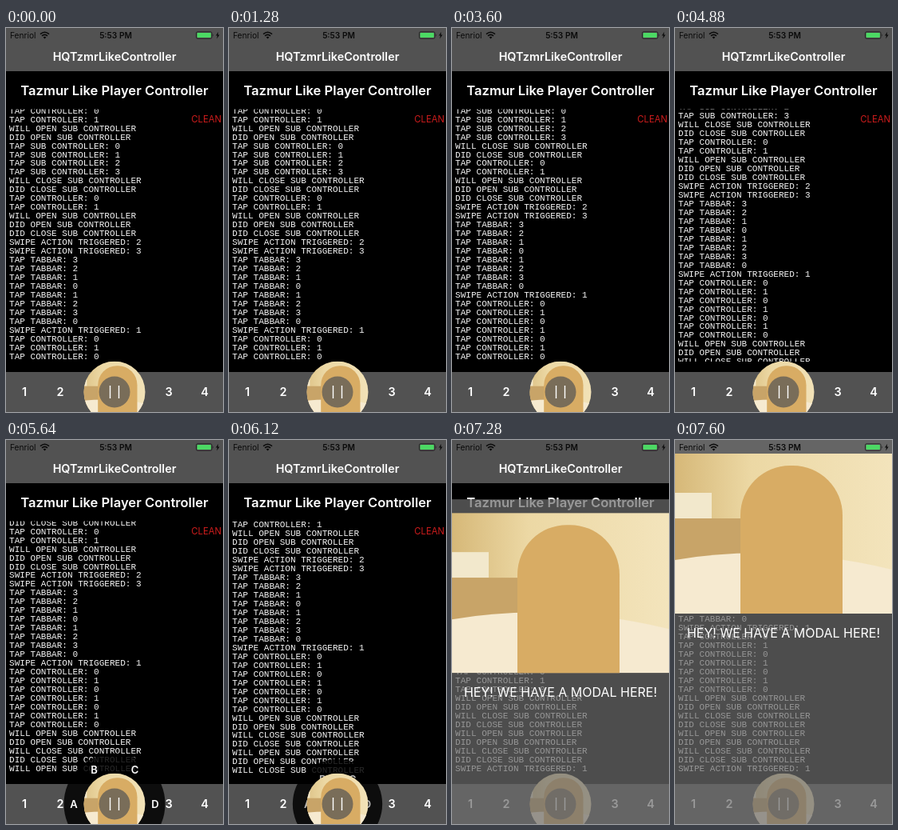
Animation of 272x480 px, one loop 8 s. Source, as an HTML page:

```html
<!DOCTYPE html>
<html lang="en">
<head>
<meta charset="utf-8">
<title>Player controller demo</title>
<style>
  html, body { margin: 0; width: 100%; height: 100%; overflow: hidden; background: #000; }
  svg { display: block; width: 272px; height: 480px; }
  text { font-family: Inter, "Open Sans", sans-serif; fill: #fff; }
  .mid { text-anchor: middle; }
  .semi { font-weight: 600; }
  .log text { font: 11.05px "Courier New", "Liberation Mono", monospace; fill: #f4f4f4; }
  .status text { font-size: 10.2px; fill: #0a0a0a; }
</style>
</head>
<body>
<svg viewBox="0 0 272 480">
  <defs>
    <linearGradient id="wall">
      <stop stop-color="#d6b878"/><stop offset=".35" stop-color="#ecd8a4"/><stop offset="1" stop-color="#f3e4bc"/>
    </linearGradient>
    <clipPath id="logClip"><rect y="101.5" width="272" height="315.5"/></clipPath>
    <clipPath id="ballClip"><circle r="38.5"/></clipPath>
    <clipPath id="photoClip"><rect y="17" width="272" height="200"/></clipPath>
    <g id="photo" clip-path="url(#photoClip)">
      <rect y="17" width="272" height="200" fill="url(#wall)"/>
      <rect y="66" width="46" height="32" fill="#f2e8cc"/>
      <rect y="98" width="92" height="52" fill="#c8a468"/>
      <path d="M0 150Q130 128 272 162V217H0Z" fill="#f6ead0"/>
      <rect x="82" y="32" width="128" height="260" rx="62" fill="#d8ac64"/>
    </g>
  </defs>

  <rect width="272" height="480"/>
  <g clip-path="url(#logClip)"><g class="log" id="log"></g></g>
  <text x="270" y="118" font-size="11.3" text-anchor="end" style="fill:#cc1c1c">CLEAN</text>

  <rect width="272" height="54" fill="#525252"/>
  <text class="mid semi" x="136" y="41" font-size="14.4">HQTzmrLikeController</text>
  <text class="mid semi" x="136" y="84" font-size="16.6">Tazmur Like Player Controller</text>

  <rect y="430" width="272" height="50" fill="#525252"/>
  <g class="mid semi" id="tabs" font-size="14.4"></g>

  <g transform="translate(136 455)">
    <circle id="disc" fill="#000" fill-opacity=".84"/>
    <g class="mid semi" id="subs" font-size="13"></g>
  </g>

  <g id="ball">
    <g clip-path="url(#ballClip)">
      <use href="#photo" transform="scale(.385) translate(-136 -117)"/>
    </g>
    <circle r="19.5" fill="#555" fill-opacity=".72"/>
    <path d="M-5.5-8V8M5.5-8V8" stroke="#fff" stroke-width="1.4"/>
  </g>

  <g id="modal">
    <rect width="272" height="480" fill="#6e6e6e" fill-opacity=".7"/>
    <use href="#photo"/>
    <text class="mid" x="136" y="247" font-size="16">HEY! WE HAVE A MODAL HERE!</text>
  </g>

  <g class="status">
    <text x="5" y="12.6">Fenriol</text>
    <text class="mid semi" x="137.5" y="12.6">5:53 PM</text>
    <path d="M43 7.6Q48.5 2.8 54 7.6M45 9.9Q48.5 6.8 52 9.9" fill="none" stroke="#0a0a0a" stroke-width="1.5"/>
    <path d="M46.6 11.6Q48.5 10 50.4 11.6L48.5 13.6Z" fill="#0a0a0a"/>
    <rect x="238.5" y="4.8" width="19.5" height="8.4" rx="1.6" fill="none" stroke="#181818" stroke-width=".8"/>
    <rect x="239.6" y="5.9" width="17.3" height="6.2" rx=".8" fill="#4cd964"/>
    <path d="M259 7.4q1.4 1.6 0 3.2z" fill="#181818"/>
    <path d="M266.2 4.8l-3.2 4.8h2l-.8 3.8 3.4-5h-2.1z" fill="#0a0a0a"/>
  </g>
</svg>
<script>
const LOOP = 8000, PITCH = 10.96, LAST_BASE = 413.6, SHOWN = 28;
const $ = id => document.getElementById(id);

function addText(parent, str, x, y) {
  const el = document.createElementNS("http://www.w3.org/2000/svg", "text");
  el.textContent = str;
  el.setAttribute("x", x);
  el.setAttribute("y", y);
  return parent.appendChild(el);
}

// Log lines
const series = (label, digits) => [...digits].map(d => `${label}: ${d}`);
const sub = (...verbs) => verbs.map(v => v + " SUB CONTROLLER");
const tap = digits => series("TAP CONTROLLER", digits);
const swipe = digits => series("SWIPE ACTION TRIGGERED", digits);
const opening = sub("WILL OPEN", "DID OPEN");
const closing = sub("WILL CLOSE", "DID CLOSE");
const lines = [
  ...tap("01"), ...opening, ...series("TAP SUB CONTROLLER", "0123"), ...closing,
  ...tap("01"), ...opening, closing[1], ...swipe("23"),
  ...series("TAP TABBAR", "32101230"), ...swipe("1"), ...tap("0101010"),
  ...opening, ...closing, ...opening, ...closing, ...swipe("1")
];
lines.forEach((s, i) => addText($("log"), s, 4, LAST_BASE + (i - SHOWN) * PITCH));

[23, 68, 204, 249].forEach((x, i) => addText($("tabs"), i + 1, x, 459.5));
const subs = [..."ABCD"].map(s => addText($("subs"), s, 0, 0));

// Tracks of [time, value]
const scroll = [
  [1560, 0], [1680, 1], [2210, 1], [2320, 2], [2640, 2], [2760, 3], [3040, 3], [3160, 4],
  [3640, 4], [3760, 5], [4120, 5], [4240, 6], [4850, 6], [4960, 8], [5240, 8], [5360, 9],
  [5880, 9], [6000, 10], [6040, 10], [6160, 11], [6280, 12], [7040, 12], [7200, 13]
];
const spread = [
  [3700, 0], [4000, 1], [4640, 1], [4800, 0], [5320, 0], [5600, 1], [6060, 1], [6240, 0]
];
const rise = [[6560, 0], [6880, 1], [7040, 1], [7040, 0]];
const fade = [[6560, 1], [6880, .08], [7040, .08], [7240, 1]];
const present = [[7040, 0], [7560, 1]];

const smooth = p => p * p * (3 - 2 * p);
const easeOut = p => 1 - (1 - p) ** 3;

function at(track, t, ease = smooth) {
  const next = track.findIndex(k => k[0] > t);
  if (next === 0) return track[0][1];
  if (next < 0) return track[track.length - 1][1];
  const [t0, a] = track[next - 1], [t1, b] = track[next];
  return a + (b - a) * ease((t - t0) / (t1 - t0));
}

function draw(t) {
  $("log").setAttribute("transform", `translate(0 ${-at(scroll, t) * PITCH})`);

  const open = at(spread, t);
  $("disc").setAttribute("r", open ? 36 + 27.5 * open : 0);
  subs.forEach((el, i) => {
    const angle = Math.PI * (1 - i / 3);
    el.setAttribute("x", 51 * open * Math.cos(angle));
    el.setAttribute("y", 4.7 - 49 * open * Math.sin(angle));
    el.setAttribute("opacity", open);
  });

  $("ball").setAttribute("transform", `translate(136 ${455 - 121 * at(rise, t)})`);
  $("ball").setAttribute("opacity", at(fade, t));

  const shown = at(present, t, easeOut);
  $("modal").setAttribute("transform", `translate(0 ${480 * (1 - shown)})`);
  $("modal").setAttribute("visibility", shown ? "visible" : "hidden");
}

const start = performance.now();
function tick() {
  draw((performance.now() - start) % LOOP);
  requestAnimationFrame(tick);
}
tick();
</script>
</body>
</html>
```
